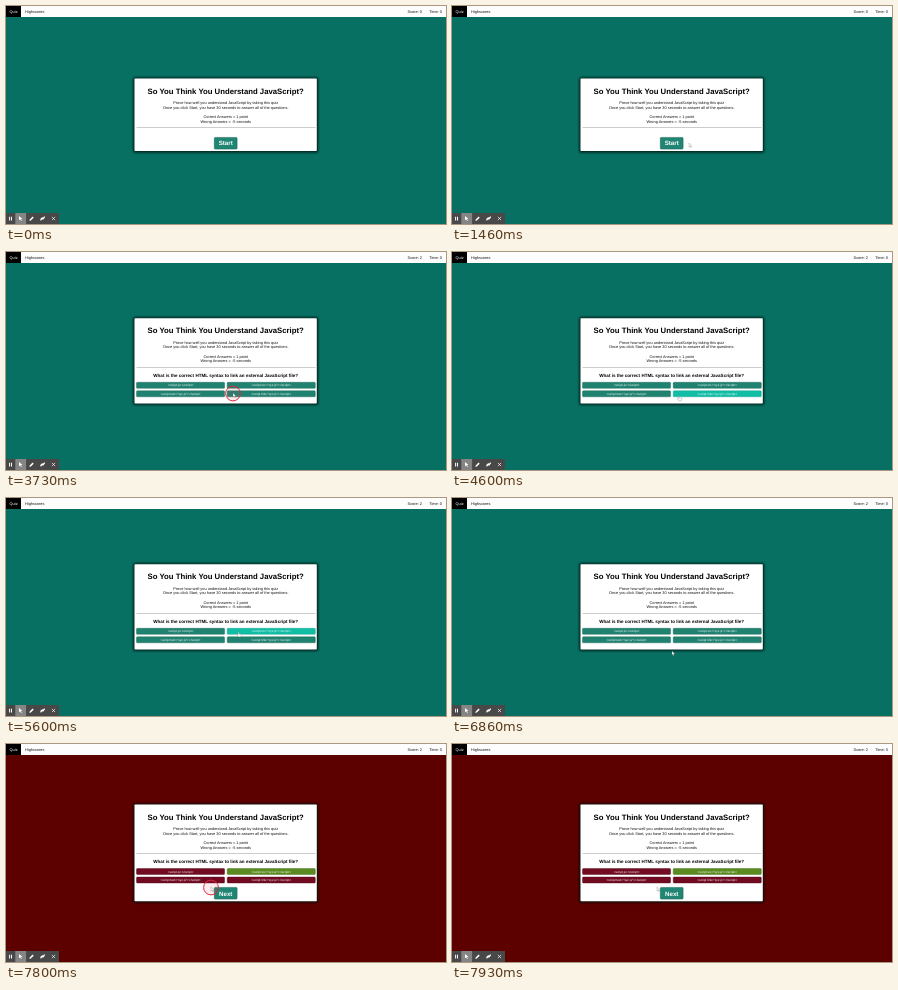
Animation of 440 by 218 pixels, one loop 8000 ms. Source, as an HTML page:

```html
<!DOCTYPE html>
<html lang="en">
<head>
<meta charset="utf-8">
<title>JavaScript quiz</title>
<style>
  html, body { margin: 0; width: 100%; height: 100%; overflow: hidden; background: #077062; }
  svg { display: block; width: 100%; height: 100%; }
  text { font-family: "Liberation Sans", Arial, sans-serif; text-rendering: geometricPrecision; }
</style>
</head>
<body>
<svg id="stage" viewBox="0 0 440 218">
  <defs>
    <filter id="soft" x="-5%" y="-10%" width="110%" height="120%"><feGaussianBlur stdDeviation="0.8"/></filter>
  </defs>
</svg>
<script>
const LOOP = 8000, START = 3730, ANSWER = 7800;
const stage = document.getElementById('stage');

function add(parent, tag, attrs, content) {
  const el = document.createElementNS('http://www.w3.org/2000/svg', tag);
  set(el, attrs);
  if (content !== undefined) el.textContent = content;
  parent.appendChild(el);
  return el;
}
function set(el, attrs) {
  for (const k in attrs) el.setAttribute(k, attrs[k]);
}
function label(parent, x, y, size, content, extra) {
  return add(parent, 'text', { x, y, 'font-size': size, fill: '#111', ...extra }, content);
}
const mid = { 'text-anchor': 'middle' };
const end = { 'text-anchor': 'end' };
const bold = { ...mid, 'font-weight': 700 };
const show = (el, on) => set(el, { visibility: on ? 'visible' : 'hidden' });

// Page and navigation bar
const page = add(stage, 'rect', { width: 440, height: 218 });
add(stage, 'rect', { width: 440, height: 11, fill: '#fdfdfd' });
add(stage, 'rect', { width: 15, height: 11, fill: '#000' });
label(stage, 7.6, 6.9, 3.88, 'Quiz', { ...mid, fill: '#fff' });
label(stage, 19, 6.9, 3.88, 'Highscores');
const score = label(stage, 416, 6.9, 3.88, '', end);
label(stage, 436, 6.9, 3.88, 'Time: 0', end);

// Card
const shadow = add(stage, 'rect', { x: 127.3, width: 184.8, rx: 1.5, fill: '#00150f', opacity: 0.9, filter: 'url(#soft)' });
const panel = add(stage, 'rect', { x: 128.5, width: 182.3, rx: 0.8, fill: '#fff' });
const card = add(stage, 'g', {});
label(card, 219.7, 15, 7.75, 'So You Think You Understand JavaScript?', { ...bold, fill: '#000' });
[
  [25.8, 'Prove how well you understand JavaScript by taking this quiz'],
  [30.2, 'Once you click Start, you have 30 seconds to answer all of the questions.'],
  [39.6, 'Correct Answers = 1 point'],
  [44, 'Wrong Answers = -5 seconds']
].forEach(([y, line]) => label(card, 219.7, y, 3.88, line, mid));
add(card, 'rect', { x: 130.5, y: 48.9, width: 179, height: 0.5, fill: '#999' });

function bigButton(y, caption) {
  const g = add(card, 'g', {});
  const box = add(g, 'rect', { x: 208.3, y, width: 22.8, height: 11.7, rx: 1, stroke: '#145c50', 'stroke-width': 0.5 });
  label(g, 219.7, y + 8.1, 6.2, caption, { ...bold, fill: '#fff' });
  return { g, box, x: 208, y, w: 23.4, h: 12 };
}
const start = bigButton(58.8, 'Start');
const next = bigButton(82.9, 'Next');

const quiz = add(card, 'g', {});
label(quiz, 219.7, 58.3, 4.54, 'What is the correct HTML syntax to link an external JavaScript file?', { ...bold, fill: '#000' });
const options = ['.js', ' src="xyz.js"', ' text="xyz.js"', ' link="xyz.js"'].map((attr, i) => {
  const o = { x: i % 2 ? 221 : 130.3, y: i < 2 ? 63.8 : 72.3, w: 88.5, h: 6.4 };
  o.box = add(quiz, 'rect', { x: o.x + 0.2, y: o.y + 0.2, width: o.w - 0.4, height: o.h - 0.4, rx: 0.9, 'stroke-width': 0.4 });
  label(quiz, o.x + o.w / 2, o.y + 4.2, 3.08, `<script${attr}><\/script>`, { ...mid, fill: '#fff' });
  return o;
});

// Recorder toolbar
add(stage, 'rect', { y: 207, width: 53, height: 11, fill: '#484848' });
add(stage, 'rect', { x: 9.3, y: 207, width: 10.8, height: 11, fill: '#858585' });
const icon = (d, attrs) => add(stage, 'path', { d, fill: '#fff', ...attrs });
icon('M3.1 210.7h1v3.8h-1zM5 210.7h1v3.8h-1z');
icon('M13 210l3.5 2.9-1.6.1.9 1.7-.7.4-.9-1.8-1.2 1z');
icon('M23.4 214.9l.3-1.4 2.9-2.9 1.1 1.1-2.9 2.9z');
icon('M34.2 213.1l1.9-1.8 1 .1 1.3-1.1.8.8-1.8 2.3-1.5.2-1.1 1.3z');
icon('M45.9 210.9l3.2 3.2M49.1 210.9l-3.2 3.2', { stroke: '#fff', 'stroke-width': 0.7 });

// Pointer
const ring = add(stage, 'circle', { r: 7.4, fill: '#e8384f', 'fill-opacity': 0.1, stroke: '#dc2940', 'stroke-width': 1 });
const edge = { fill: '#fff', stroke: '#555', 'stroke-width': 0.25 };
const arrow = add(stage, 'path', { d: 'M0 0v4l.9-.8.7 1.5.6-.3-.7-1.4h1.3z', ...edge });
const hand = add(stage, 'path', { d: 'M-.4.3q.4-.5.8 0v1.5l2 .5q.4.1.3.7l-.4 1.8h-2.5l-1.6-2q.2-.6.8-.2l.6.4z', ...edge });

// Pointer stops: time, x, y
const path = [
  [600, 362, 80], [1400, 237, 137], [2000, 237, 137], [2400, 240, 134],
  [2930, 232.5, 138], [3300, 234, 141], [3660, 227, 141], [3800, 227, 141],
  [4050, 227, 144], [5130, 227, 144], [5500, 236, 134], [5900, 214, 134],
  [6300, 205, 142], [6700, 220, 153], [6930, 220, 153], [7300, 205, 143], [8000, 205, 143]
];
function pointer(t) {
  const i = path.findIndex(p => p[0] > t);
  if (i < 1) return path[0].slice(1);
  const [a, b] = [path[i - 1], path[i]];
  const u = (t - a[0]) / (b[0] - a[0]);
  const k = u * u * (3 - 2 * u);
  return [a[1] + (b[1] - a[1]) * k, a[2] + (b[2] - a[2]) * k];
}

function draw(t) {
  const asked = t >= START, done = t >= ANSWER;
  const top = done ? 60.5 : asked ? 66.3 : 72.6;
  const height = done ? 96.8 : asked ? 85.2 : 72.5;
  const [px, py] = pointer(t);
  const over = b => px >= b.x && px <= b.x + b.w && py >= top + b.y && py <= top + b.y + b.h;

  set(page, { fill: done ? '#5c0000' : '#077062' });
  score.textContent = 'Score: ' + (asked ? 2 : 0);
  set(shadow, { y: top - 1.1, height: height + 2.4 });
  set(panel, { y: top, height });
  set(card, { transform: `translate(0 ${top})` });
  show(start.g, !asked);
  show(quiz, asked);
  show(next.g, done);
  set(start.box, { fill: '#218574' });
  set(next.box, { fill: '#218574' });

  let active = !asked && over(start);
  options.forEach((o, i) => {
    const hot = asked && t > START + 70 && over(o);
    active = active || hot;
    const fill = done ? (i === 1 ? '#5a8a20' : '#720a21') : hot ? '#10bda5' : '#208270';
    const stroke = done ? (i === 1 ? '#3c6510' : '#4d0615') : hot ? '#0b9d89' : '#14614f';
    set(o.box, { fill, stroke });
  });

  const at = { transform: `translate(${px} ${py})` };
  set(arrow, at);
  set(hand, at);
  show(arrow, t >= 600 && !active);
  show(hand, t >= 600 && active);

  const since = t >= 7730 ? t - 7730 : t - START;
  const alpha = since < 0 ? 0 : Math.max(0, Math.min(1, (190 - since) / 110));
  set(ring, { cx: px, cy: py + 0.5, opacity: alpha });
}

function tick() {
  draw(performance.now() % LOOP);
  requestAnimationFrame(tick);
}
tick();
</script>
</body>
</html>
```
